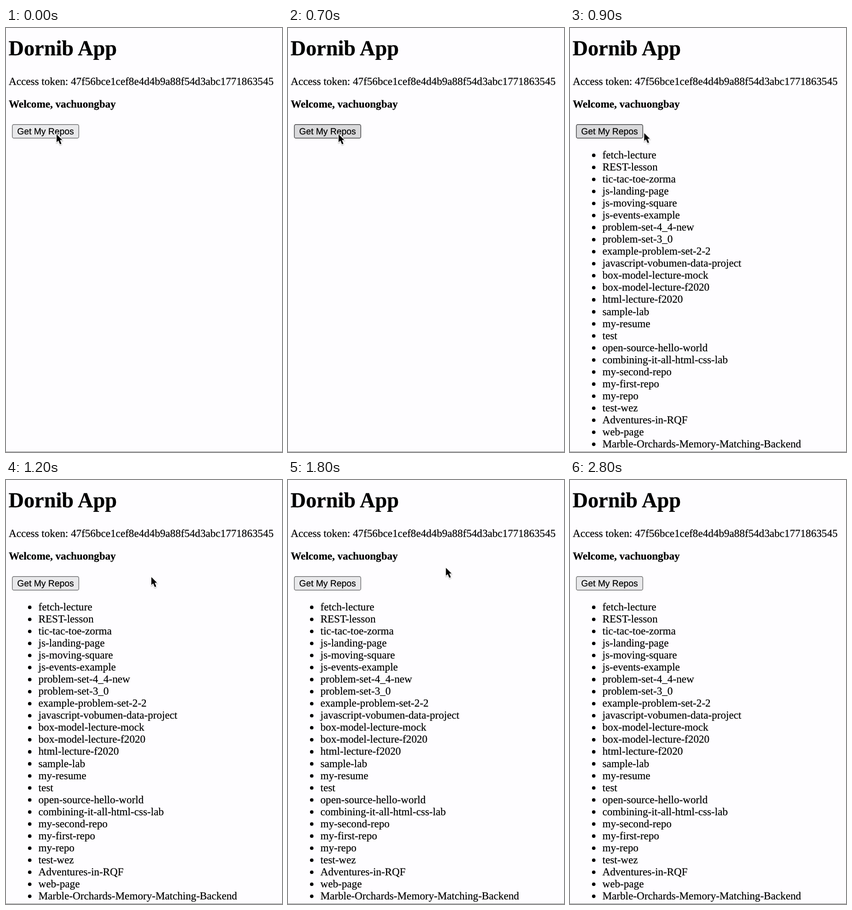
Animation, 600 px wide and 917 px high, one loop 2900 ms. Source, as an HTML page:

```html
<!DOCTYPE html>
<html lang="en">
<head>
<meta charset="utf-8">
<title>Repo list</title>
<style>
  html, body { margin: 0; width: 100%; height: 100%; overflow: hidden; background: #fefdff; }
  svg { display: block; width: 600px; height: 917px; }
  text {
    font: 23.15px "Liberation Serif", Times, serif;
    fill: #000;
    stroke: #000;
    stroke-width: .25;
    text-rendering: geometricPrecision;
  }
  .title { font-size: 46.3px; font-weight: bold; }
  .bold { font-weight: bold; }
  .label { font: 19.3px "Liberation Sans", Arial, sans-serif; }
  #button { stroke-width: 1.45; }
</style>
</head>
<body>
<svg viewBox="0 0 600 917">
  <defs>
    <filter id="soft" x="-50%" y="-50%" width="200%" height="200%">
      <feGaussianBlur stdDeviation="1.3"/>
    </filter>
    <path id="arrow" d="M0 0V17L3.9 13.4L7.4 21.6L10.6 20.3L7.2 12.3H12.3Z"/>
  </defs>
  <text class="title" x="5.5" y="59.2">Dornib App</text>
  <text x="6" y="123">Access token: 47f56bce1cef8e4d4b9a88f54d3abc1771863545</text>
  <text class="bold" x="6" y="172">Welcome, vachuongbay</text>
  <rect id="button" x="13.7" y="208.7" width="144.6" height="29.6" rx="3.6"/>
  <text class="label" x="24.3" y="230">Get My Repos</text>
  <g id="list"></g>
  <rect y="916" width="600" height="1" fill="#858585"/>
  <g id="cursor">
    <use href="#arrow" y="1.5" stroke="#000" stroke-width="2" opacity=".35" filter="url(#soft)"/>
    <use href="#arrow" fill="#fff" stroke="#fff" stroke-width="3" stroke-linejoin="round"/>
    <use href="#arrow"/>
  </g>
</svg>
<script>
const LOOP = 2900;
const $ = id => document.getElementById(id);

const repos = `fetch-lecture REST-lesson tic-tac-toe-zorma js-landing-page
  js-moving-square js-events-example problem-set-4_4-new problem-set-3_0
  example-problem-set-2-2 javascript-vobumen-data-project box-model-lecture-mock
  box-model-lecture-f2020 html-lecture-f2020 sample-lab my-resume test
  open-source-hello-world combining-it-all-html-css-lab my-second-repo
  my-first-repo my-repo test-wez Adventures-in-RQF web-page
  Marble-Orchards-Memory-Matching-Backend`.split(/\s+/);

function add(tag, attrs, label = "") {
  const el = document.createElementNS("http://www.w3.org/2000/svg", tag);
  for (const key in attrs) el.setAttribute(key, attrs[key]);
  el.textContent = label;
  $("list").append(el);
}

repos.forEach((name, i) => {
  const y = 282 + i * 26.04;
  add("circle", { cx: 51.6, cy: y - 6.6, r: 3.8 });
  add("text", { x: 70.5, y }, name);
});

// Each step is [time in ms, style], held until the next one.
function play(id, steps) {
  const frames = steps.map(([t, style]) => ({ offset: t / LOOP, easing: "steps(1, end)", ...style }));
  frames.push({ ...frames[frames.length - 1], offset: 1 });
  $(id).animate(frames, { duration: LOOP, iterations: Infinity });
}

const paint = (fill, stroke) => ({ fill, stroke });
const at = (x, y, opacity = 1) => ({ transform: `translate(${x}px, ${y}px)`, opacity });

const idle = paint("#e9e9eb", "#707072");
const pressed = paint("#f2f2f4", "#8a8a8c");
const hover = paint("#d9d9db", "#454547");

play("button", [[0, idle], [600, pressed], [700, hover], [1000, idle]]);
play("list", [[0, { opacity: 0 }], [900, { opacity: 1 }]]);
play("cursor", [
  [0, at(110, 230)],
  [900, at(161.3, 227.3)],
  [1000, at(240, 150)],
  [1100, at(305, 110)],
  [1200, at(316, 210)],
  [1800, at(343.3, 190)],
  [1900, at(343.3, 190, 0)]
]);
</script>
</body>
</html>
```
